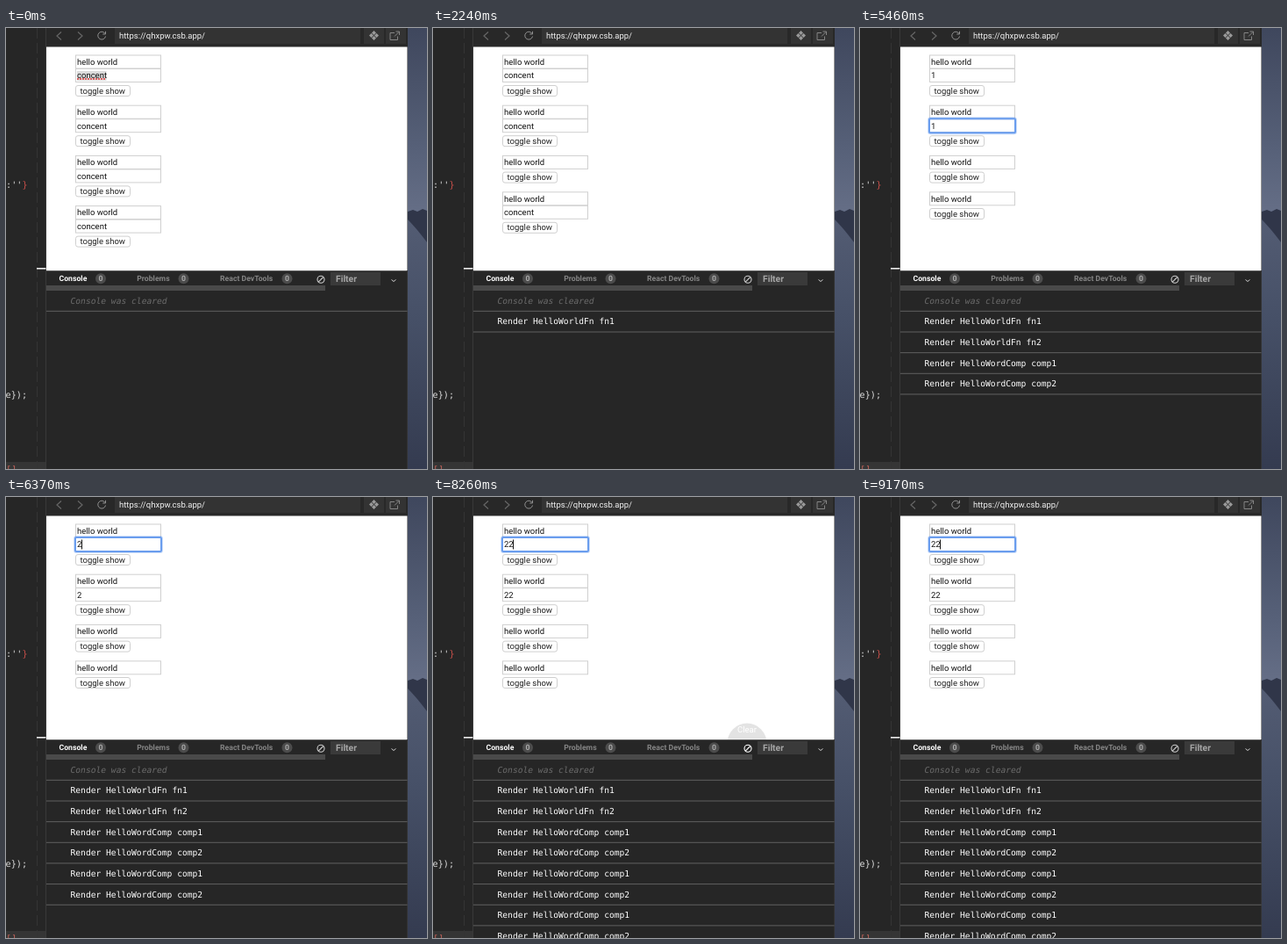
An HTML page for the animation above (9240 ms loop, 480 px wide and 502 px high).

```html
<!DOCTYPE html>
<html lang="en">
<head>
<meta charset="utf-8">
<title>Shared state demo</title>
<style>
  html, body { margin: 0; width: 100%; height: 100%; overflow: hidden; background: #262626; }
  svg { display: block; width: 480px; height: 502px; }
  text { white-space: pre; text-rendering: geometricPrecision; }
  .ui { font: 9.5px Roboto, "Liberation Sans", sans-serif; }
  .tab { font: bold 8.7px Roboto, "Liberation Sans", sans-serif; }
  .filter { font-size: 10.3px; }
  .mono { font: 9.65px "DejaVu Sans Mono", monospace; }
  .notice { font-style: italic; }
  .code { font: 10.2px "DejaVu Sans Mono", monospace; }
</style>
</head>
<body>
<svg id="stage" viewBox="0 0 480 502" xmlns="http://www.w3.org/2000/svg">
  <defs>
    <linearGradient id="sky" x2="0" y2="1">
      <stop offset="0" stop-color="#3f475d"/><stop offset=".6" stop-color="#566078"/><stop offset="1" stop-color="#687189"/>
    </linearGradient>
    <linearGradient id="dune" x2="0" y2="1">
      <stop offset="0" stop-color="#535c73"/><stop offset=".4" stop-color="#465067"/><stop offset="1" stop-color="#343b50"/>
    </linearGradient>
    <clipPath id="tipBox"><rect x="314" y="252" width="89" height="23.5" rx="4"/></clipPath>
  </defs>

  <g id="wallpaper">
    <rect x="458" width="22" height="225" fill="url(#sky)"/>
    <path d="M458 209l6 -2 5 2 6-3 5 2v40h-22z" fill="#303649"/>
    <path d="M458 218q10 10 22 26v258h-22z" fill="url(#dune)"/>
  </g>

  <g id="editor">
    <rect width="46" height="502" fill="#262626"/>
    <rect y="494" width="45" height="8" fill="#353535"/>
    <path d="M35.5 0V502" stroke="#343434" stroke-dasharray="12 5"/>
    <path d="M45.5 0V502" stroke="#393939"/>
    <path d="M35 273.800H45.500" stroke="#eee" stroke-width="1.6"/>
    <g class="code" fill="#ddd">
      <text x="0" y="182.300">:''<tspan fill="#c9504a">}</tspan></text>
      <text x="-.5" y="421.300">e});</text>
      <text x="0" y="506" fill="#c9655c">[]</text>
    </g>
  </g>

  <g id="toolbar">
    <rect x="46" width="412" height="22" fill="#282828"/>
    <rect x="124" width="280" height="18" fill="#333"/>
    <rect x="408" width="23" height="18" fill="#333"/>
    <rect x="433" width="23" height="18" fill="#333"/>
    <g fill="none" stroke="#666" stroke-width="1.2">
      <path d="M63 4.500l-5 4.500 5 4.500M82 4.500l5 4.500-5 4.500"/>
      <path d="M113 6.500a4.400 4.400 0 1 0 .5 3M113.500 3.800v3.200h-3.200" stroke="#909090" stroke-width="1"/>
      <path d="M443 5.500h-5v8h8.500v-4M444.500 4h4v4M448 4.500l-5 5" stroke="#858585" stroke-width="1"/>
    </g>
    <path d="M419.500 3l2.500 2.500-2.500 2.500-2.500-2.500zM419.500 9l2.500 2.500-2.500 2.500-2.500-2.500zM416.500 6l2.500 2.500-2.500 2.500-2.500-2.500zM422.500 6l2.500 2.500-2.500 2.500-2.500-2.500z" fill="#999"/>
    <text class="ui" x="129" y="12" fill="#f2f2f2">https://qhxpw.csb.app/</text>
  </g>

  <rect x="46" y="21.500" width="411.500" height="255" fill="#fff"/>
  <g id="forms" class="ui"></g>
  <g clip-path="url(#tipBox)">
    <g id="tip">
      <circle cx="358" cy="280" fill="#333"/>
      <text class="ui" x="358" y="268" fill="#fff" text-anchor="middle">Clear</text>
    </g>
  </g>

  <g id="console">
    <rect x="46" y="276.500" width="412" height="225.500" fill="#262626"/>
    <path d="M457.500 276V502" stroke="#333"/>
    <g id="tabs" class="tab"></g>
    <g id="clear" fill="none" stroke-width="1.1"><circle cx="359" cy="286.300" r="4"/><path d="M361.800 283.500l-5.600 5.600"/></g>
    <rect x="370" y="278" width="57" height="15" fill="#3a3a3a"/>
    <text x="376" y="288.700" class="tab filter" fill="#a6a6a6">Filter</text>
    <path d="M439.500 286.500l2.500 2 2.500-2" fill="none" stroke="#ccc"/>
    <rect x="46" y="293" width="318" height="6" fill="#4a4a4a"/>
    <text class="mono notice" x="73.500" y="314" fill="#6c6c6c">Console was cleared</text>
    <path d="M46 322.300H457.500" stroke="#606060"/>
    <g id="log" class="mono"></g>
  </g>
</svg>
<script>
const LOOP = 9240, STEP = 70;
const $ = id => document.getElementById(id);

function add(parent, tag, attrs = {}, content = '') {
  const node = document.createElementNS('http://www.w3.org/2000/svg', tag);
  set(node, attrs);
  node.textContent = content;
  parent.append(node);
  return node;
}
function set(node, attrs) {
  for (const key in attrs) node.setAttribute(key, attrs[key]);
}
const show = (node, on) => set(node, { visibility: on ? 'visible' : 'hidden' });
const within = (t, from, to) => t >= from && t < to;

function tab(x, label, badgeX, color) {
  add($('tabs'), 'text', { x, y: 288.2, fill: color }, label);
  add($('tabs'), 'rect', { x: badgeX - 6, y: 279.3, width: 12, height: 12, rx: 6, fill: '#4c4c4c' });
  add($('tabs'), 'text', { x: badgeX, y: 288.2, fill: '#aaa', 'text-anchor': 'middle' }, '0');
}
tab(60.5, 'Console', 108, '#fff');
tab(149.2, 'Problems', 202.5, '#858585');
tab(244, 'React DevTools', 320.5, '#858585');

function field(parent, y, value) {
  const box = add(parent, 'g', { transform: `translate(79 ${y})` });
  add(box, 'rect', { x: .5, y: .5, width: 97, height: 15, fill: '#fff', stroke: '#d0d0d0' });
  const ring = add(box, 'g', { fill: 'none', stroke: '#6a9dee' });
  add(ring, 'rect', { x: -.5, y: -.5, width: 99, height: 17, rx: 2, 'stroke-width': 3, opacity: .35 });
  add(ring, 'rect', { x: 0, y: 0, width: 98, height: 16, rx: 1, 'stroke-width': 2 });
  const mark = add(box, 'rect', { x: 2, y: 3, height: 11 });
  const text = add(box, 'text', { x: 2, y: 11.4, fill: '#111' }, value);
  const caret = add(box, 'rect', { y: 2.5, width: 1, height: 11, fill: '#111' });
  return { ring, mark, text, caret };
}

function setField(f, { value, focus, caretX, selected, selectColor }) {
  f.text.textContent = value;
  show(f.ring, focus);
  set(f.caret, { x: caretX || 0 });
  show(f.caret, !!caretX);
  set(f.mark, { width: selected || 0, fill: selectColor || '#b5d5fb' });
}

const forms = [0, 1, 2, 3].map(() => {
  const group = add($('forms'), 'g');
  setField(field(group, 30.5, 'hello world'), { value: 'hello world', focus: false });
  const lower = add(group, 'g');
  const second = field(lower, 46, 'concent');
  setField(second, { value: 'concent', focus: false });
  const button = add(group, 'g');
  add(button, 'rect', { x: 79.5, y: 65.5, width: 62, height: 12, rx: 2.5, fill: '#fff', stroke: '#cfcfcf' });
  add(button, 'text', { x: 84.5, y: 74.6, fill: '#222' }, 'toggle show');
  return { group, lower, second, button };
});
const squiggle = add(forms[0].group, 'path', {
  d: 'M81 58H114', stroke: '#e03c3c', 'stroke-width': 1.5, 'stroke-dasharray': '2 1'
});

// Times at which each console line is printed
const printed = [
  [2170, 'Fn fn1'], [3290, 'Fn fn2'],
  ...[4830, 6370, 7070].flatMap(at => [[at, 'Comp comp1'], [at, 'Comp comp2']])
];
const logLines = printed.map(([at, name], i) => {
  const row = add($('log'), 'g', { transform: `translate(0 ${i * 23.65})` });
  const prefix = name.startsWith('Fn') ? 'Render HelloWorld' : 'Render HelloWord';
  add(row, 'text', { x: 73.5, y: 337.4, fill: '#fff' }, prefix + name);
  add(row, 'path', { d: 'M46 346H457.500', stroke: '#606060' });
  return { at, row };
});

const hideAt = [Infinity, Infinity, 2100, 3220];

function sharedValue(t) {
  return t < 4760 ? 'concent' : t < 6370 ? '1' : t < 7000 ? '2' : '22';
}

function firstField(t, value) {
  const focus = within(t, 1610, 2100) || t >= 5880;
  const caretOn = [[5880, 6020], [6370, 6860], [7000, 7490], [8050, 8540], [9100, LOOP]]
    .some(([from, to]) => within(t, from, to));
  const selected = t < 2100 ? 33.5 : within(t, 6020, 6370) ? 5.5 : 0;
  return {
    value, focus, selected,
    selectColor: t < 1610 ? '#dcdcdc' : '#b5d5fb',
    caretX: caretOn ? 2 + 5 * value.length : 0
  };
}

function secondField(t, value) {
  return {
    value,
    focus: within(t, 4340, 5880),
    selected: within(t, 4480, 4760) ? 33.5 : 0,
    caretX: within(t, 4760, 5390) ? 7 : 0
  };
}

function draw(t) {
  const value = sharedValue(t);
  setField(forms[0].second, firstField(t, value));
  setField(forms[1].second, secondField(t, value));
  show(squiggle, t < 2100);

  let y = 0;
  forms.forEach(({ group, lower, button }, i) => {
    const open = t < hideAt[i];
    set(group, { transform: `translate(0 ${y})` });
    set(lower, { display: open ? 'inline' : 'none' });
    set(button, { transform: `translate(0 ${open ? 0 : -15.8})` });
    y += open ? 57.2 : 41.4;
  });

  logLines.forEach(({ at, row }) => show(row, t >= at));

  const grow = Math.max(0, Math.min(1, (t - 8190) / 350, (8890 - t) / 280));
  set($('tip'), { opacity: grow ** 1.25 });
  set($('tip').firstElementChild, { r: 12 + 52 * grow });
  set($('clear'), { stroke: within(t, 7910, 8890) ? '#fff' : '#ccc' });
}

const start = performance.now();
function tick() {
  const elapsed = (performance.now() - start) % LOOP;
  draw(Math.floor(elapsed / STEP) * STEP);
  requestAnimationFrame(tick);
}
tick();
</script>
</body>
</html>
```
